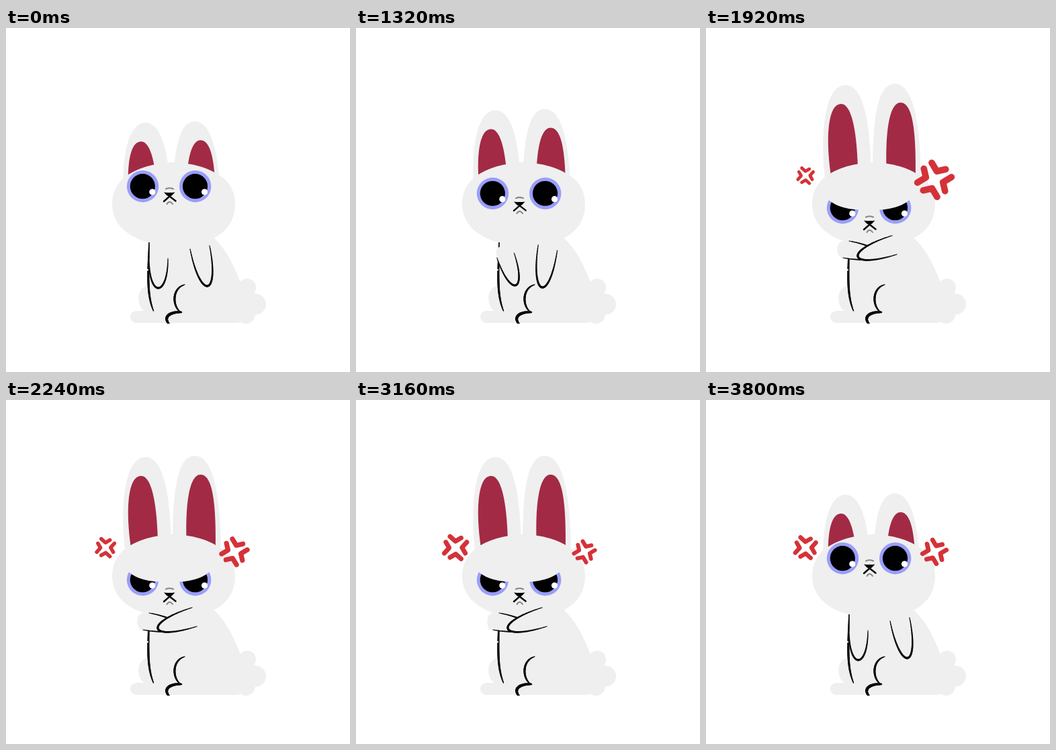
An HTML page with a canvas that plays this animation: 512 px wide and 512 px high, repeating every 3.84 s.

```html
<!DOCTYPE html>
<html lang="en">
<head>
<meta charset="utf-8">
<title>Grumpy bunny</title>
<style>
  html, body { margin: 0; width: 100%; height: 100%; overflow: hidden; background: #fff; }
  canvas { display: block; width: 512px; height: 512px; }
</style>
</head>
<body>
<canvas id="stage" width="512" height="512"></canvas>
<script>
const ctx = document.getElementById('stage').getContext('2d');
const LOOP = 3840;
const FUR = '#efefef', PINK = '#a22a45', IRIS = '#9a9efa', RED = '#d43238', INK = '#0b0b0b', GREY = '#858585';

const lerp = (a, b, k) => a + (b - a) * k;
const clamp = k => Math.min(1, Math.max(0, k));
const ramp = (t, from, to) => {
  const k = clamp((t - from) / (to - from));
  return k * k * (3 - 2 * k);
};

function fill(path, color) {
  ctx.fillStyle = color;
  ctx.fill(typeof path === 'string' ? new Path2D(path) : path);
}

function disc(x, y, r, color) {
  ctx.beginPath();
  ctx.arc(x, y, r, 0, 7);
  ctx.fillStyle = color;
  ctx.fill();
}

function stroke(path, width, color) {
  ctx.lineWidth = width;
  ctx.strokeStyle = color;
  ctx.stroke(new Path2D(path));
}

function cubic(a, b, c, d, steps = 48) {
  return Array.from({ length: steps + 1 }, (_, i) => {
    const u = i / steps, v = 1 - u;
    return [0, 1].map(n =>
      v * v * v * a[n] + 3 * v * v * u * b[n] + 3 * v * u * u * c[n] + u * u * u * d[n]);
  });
}

// Pen stroke that thins towards both ends
function brush(samples, width, thin = 0.35) {
  const last = samples.length - 1;
  for (let i = 0; i < last; i++) {
    const swell = Math.sin(Math.PI * (i + 0.5) / last) ** 0.7;
    stroke(`M${samples[i]}L${samples[i + 1]}`, width * lerp(thin, 1, swell), INK);
  }
}

const BODY = `M213,312 L211,384 C193,386 194,414 206,421 L194,421 A9,9 0 0 0 194,439
  L345,439 L372,426 L372,396 L350,382 C339,352 328,330 309,312Z`;
const HEAD = `M247,200 C222,201 195,208 178,221 C165,231 158,245 158,262
  C158,292 182,312 213,319 L290,319 Q303,316 309,313 C328,303 341,287 341,262
  C341,240 330,225 312,216 C298,207 272,200 247,200Z`;
const EARS = `M178,230 C169,160 176,85 207.5,85 C233,85 246,135 246,230Z
  M248.5,230 C247,140 254,83 281,83 C308,83 320,140 320,230Z`;
const INNER_EARS = `M187,225 C178,170 180,113 201,113 C219,113 226,165 226.5,225Z
  M269.5,225 C266,165 271,111 289.5,111 C309,111 313,160 312,225Z`;

// Each pose is shoulder, paw, shoulder: hanging, swinging, folded
const LEFT_ARM = [
  [[213, 345], [227, 387], [241, 343]],
  [[210, 342], [237, 383], [236, 335]],
  [[204, 342], [255, 338], [213, 317]]
];
const RIGHT_ARM = [
  [[274, 329], [300, 384], [303, 324]],
  [[271, 323], [278, 386], [300, 331]],
  [[277, 309], [226, 340], [284, 337]]
];
const SWING = 0.31;

// Goes through the three poses; the lift lags behind the sideways move
function viaSwing(p, hang, swing, fold, lag = 1) {
  const early = clamp(p / SWING), late = clamp((p - SWING) / (1 - SWING));
  return lerp(lerp(hang, swing, early), fold, late ** lag);
}

function arm([hang, swing, fold], p, width) {
  const [start, paw, end] = hang.map((point, i) => point.map((value, axis) =>
    viaSwing(p, value, swing[i][axis], fold[i][axis], axis + 1)));
  // Handles that carry the curve through the paw at its middle
  const handle = side => [0, 1].map(n =>
    (8 * paw[n] - start[n] - end[n]) / 6 + side * (start[n] - end[n]) / 2);
  const samples = cubic(start, handle(1), handle(-1), end);
  fill(new Path2D('M' + samples.join('L')), FUR);
  brush(samples, width);
}

function drawBody() {
  fill(BODY, FUR);
  disc(359, 386, 13, FUR);
  disc(371.5, 411, 15.5, FUR);
  disc(357, 426, 14, FUR);
  brush(cubic([213, 317], [212, 366], [209, 395], [219.5, 421]), 3.2, 0.4);
  disc(210.8, 360, 1.2, '#fff');
  brush(cubic([266, 382], [247, 387], [247, 414], [260, 423]), 3);
  ctx.save();
  ctx.beginPath();
  ctx.rect(0, 0, 512, 440);
  ctx.clip();
  brush(cubic([261, 423], [244, 422], [233, 430], [243, 441]), 4.2, 0.6);
  ctx.restore();
}

function drawEars(p) {
  ctx.save();
  ctx.translate(0, 56 * (1 - p));
  fill(EARS, FUR);
  fill(INNER_EARS, PINK);
  ctx.restore();
}

function drawElbow(p) {
  ctx.beginPath();
  ctx.roundRect(viaSwing(p, 215, 209, 195.5), lerp(329, 316, p), 40, lerp(15, 28, p), lerp(7, 12, p));
  ctx.fillStyle = FUR;
  ctx.fill();
}

function eye(x, y, shine, side, lidDrop) {
  disc(x, y, 23.7, IRIS);
  disc(x - 0.2, y, 18.6, '#000');
  disc(shine, y + 8.4, 4.6, '#fff');
  if (lidDrop <= 0) return;
  ctx.save();
  ctx.beginPath();
  ctx.arc(x, y, 25, 0, 7);
  ctx.clip();
  ctx.translate(x, y - 40 * (1 - lidDrop));
  ctx.scale(side, 1);
  fill('M-27,-60 L-27,-18 Q-11,2 27,3 L27,-60Z', FUR);
  ctx.restore();
}

function drawFace(p) {
  const eyeY = 235.7 + 32 * p;
  const lid = clamp((p - 0.34) / 0.66);
  eye(203.5, eyeY, 217.8, 1, lid);
  eye(281.7, eyeY, 295.5, -1, lid);

  ctx.save();
  ctx.translate(0, 42 * p);
  stroke('M238,239.5 Q243,237 249,239.5', 2, GREY);
  fill('M235,244.5 Q243,245.5 251.5,244.5 Q248,249 243.5,251.5 Q238,249 235,244.5Z', '#000');
  stroke('M235,258 L243.5,250.5 L252.5,257.5', 2.5, INK);
  stroke('M239.5,262 Q243.5,255.5 248,262', 2, GREY);
  ctx.restore();
}

// Rises from nothing, overshoots at the peak time and rings down
function spring(t, { start, peak, period, size, swing, decay }) {
  const cross = peak - period / 4;
  if (t < cross) return size * clamp((t - start) / (cross - start));
  const lag = t - peak;
  return size + swing * Math.exp(-decay * lag / 1000) * Math.cos(2 * Math.PI * lag / period);
}

const MARKS = [
  { x: 148.2, y: 219.8, turn: -0.3, start: 1505, peak: 1709, period: 380, size: 21, swing: 8, decay: 1 },
  { x: 340, y: 226, turn: 0, start: 1766, peak: 1920, period: 270, size: 20.2, swing: 10, decay: 1.3 }
];

function drawMark(t, mark) {
  const scale = spring(t, mark) / 29.7;
  if (scale <= 0) return;
  ctx.save();
  ctx.translate(mark.x, mark.y);
  ctx.rotate(mark.turn);
  ctx.scale(scale, scale);
  for (let i = 0; i < 4; i++) {
    stroke('M-4,-25 L3.5,-12.5 L16.5,-15.5', 9.5, RED);
    ctx.rotate(Math.PI / 2);
  }
  ctx.restore();
}

function draw(t) {
  const anger = ramp(t, 990, 1850) - ramp(t, 3180, 3810);
  ctx.fillStyle = '#fff';
  ctx.fillRect(0, 0, 512, 512);
  ctx.lineCap = ctx.lineJoin = 'round';
  drawBody();
  drawEars(anger);
  fill(HEAD, FUR);
  drawElbow(anger);
  arm(LEFT_ARM, anger, 2.8);
  arm(RIGHT_ARM, anger, 3);
  drawFace(anger);
  MARKS.forEach(mark => drawMark(t, mark));
}

const begin = performance.now();
function tick() {
  draw((performance.now() - begin) % LOOP);
  requestAnimationFrame(tick);
}
tick();
</script>
</body>
</html>
```
